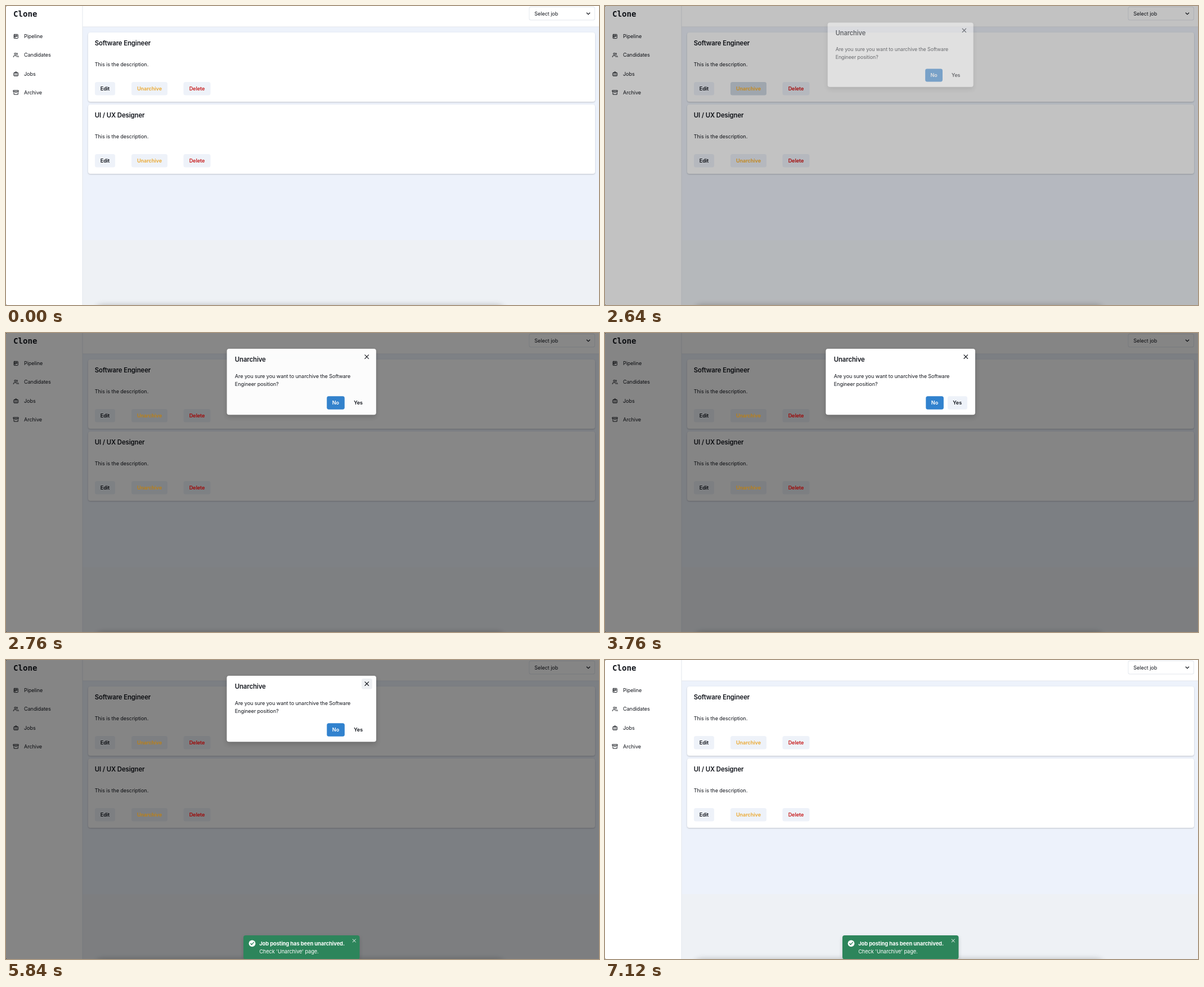
Write an HTML page with a canvas that moves like this. It is 1054x531 px and loops after 8000 ms.

```html
<!DOCTYPE html>
<html lang="en">
<head>
<meta charset="utf-8">
<title>Archived jobs</title>
<style>
  html, body { margin: 0; width: 100%; height: 100%; overflow: hidden; background: #fff; }
  canvas { display: block; width: 1054px; height: 531px; }
</style>
</head>
<body>
<canvas id="stage"></canvas>
<script>
const W = 1054, H = 531, LOOP = 8000, STEP = 40;
const SANS = 'Inter, "Open Sans", sans-serif';
const BODY = 9.15, HEAD = 11.4;
const INK = '#13161d', LINE = '#e4e8ee', SOFT = '#eef2f9';
const ORANGE = '#eba82f', RED = '#c81e1e', GREEN = '#2d855b';
const dpr = window.devicePixelRatio || 1;

function setUp(canvas) {
  canvas.width = W * dpr;
  canvas.height = H * dpr;
  const context = canvas.getContext('2d');
  context.scale(dpr, dpr);
  return context;
}

const screen = setUp(document.getElementById('stage'));
const layerCanvas = document.createElement('canvas');
const layer = setUp(layerCanvas);
let ctx = screen;

// --- timing helpers ---
const clamp = v => Math.min(1, Math.max(0, v));
const ramp = (t, from, to) => clamp((t - from) / (to - from));

function bezier(x1, y1, x2, y2) {
  const at = (a, b, u) => 3 * a * u * (1 - u) ** 2 + 3 * b * u * u * (1 - u) + u ** 3;
  return x => {
    if (x <= 0 || x >= 1) return clamp(x);
    let lo = 0, hi = 1;
    for (let i = 0; i < 30; i++) {
      const mid = (lo + hi) / 2;
      if (at(x1, x2, mid) < x) lo = mid; else hi = mid;
    }
    return at(y1, y2, lo);
  };
}
const easeOut = bezier(0, 0, 0.2, 1);
const easeIn = bezier(0.4, 0, 1, 1);
const easeInOut = bezier(0.4, 0, 0.2, 1);

// --- drawing helpers ---
function box(x, y, w, h, r, fill) {
  ctx.beginPath();
  ctx.roundRect(x, y, w, h, r);
  ctx.fillStyle = fill;
  ctx.fill();
}

function shadowed(color, blur, dy, draw) {
  ctx.save();
  ctx.shadowColor = color;
  ctx.shadowBlur = blur * dpr;
  ctx.shadowOffsetY = dy * dpr;
  draw();
  ctx.restore();
}

function text(label, x, midY, { size = BODY, weight = 400, color = INK, align = 'left' } = {}) {
  ctx.font = `${weight} ${size}px ${SANS}`;
  ctx.letterSpacing = `${-0.01 * size}px`;
  ctx.textAlign = align;
  ctx.fillStyle = color;
  ctx.fillText(label, x, midY + size * 0.36);
}

function polyline(points, color, width) {
  ctx.beginPath();
  points.forEach(([x, y]) => ctx.lineTo(x, y));
  ctx.strokeStyle = color;
  ctx.lineWidth = width;
  ctx.lineCap = ctx.lineJoin = 'round';
  ctx.stroke();
}

function cross(x, y, r, color, width) {
  polyline([[x - r, y - r], [x + r, y + r]], color, width);
  polyline([[x - r, y + r], [x + r, y - r]], color, width);
}

const withAlpha = (alpha, draw) => {
  ctx.save();
  ctx.globalAlpha *= alpha;
  draw();
  ctx.restore();
};

// --- page ---
const MENU = [
  ['Pipeline', 54, 'M5 3H19A2 2 0 0 1 21 5V19A2 2 0 0 1 19 21H5A2 2 0 0 1 3 19V5A2 2 0 0 1 5 3ZM7 7h3v9h-3zM14 7h3v5h-3z'],
  ['Candidates', 87, 'M17 21v-2a4 4 0 0 0-4-4H5a4 4 0 0 0-4 4v2M13 7a4 4 0 1 1-8 0a4 4 0 1 1 8 0M23 21v-2a4 4 0 0 0-3-3.87M16 3.13a4 4 0 0 1 0 7.75'],
  ['Jobs', 120.5, 'M4 7H20A2 2 0 0 1 22 9V19A2 2 0 0 1 20 21H4A2 2 0 0 1 2 19V9A2 2 0 0 1 4 7ZM16 21V5a2 2 0 0 0-2-2h-4a2 2 0 0 0-2 2v16'],
  ['Archive', 153.5, 'M21 8v13H3V8M1 3h22v5H1zM10 12h4']
].map(([label, y, d]) => ({ label, y, icon: new Path2D(d) }));

const BUTTONS = [
  ['Edit', 158, 36, INK],
  ['Unarchive', 223, 64, ORANGE],
  ['Delete', 315.5, 48, RED]
];
const CARDS = [['Software Engineer', 47], ['UI / UX Designer', 175]];

function drawSidebar() {
  ctx.font = 'bold 14.1px "DejaVu Sans Mono", monospace';
  ctx.letterSpacing = '0px';
  ctx.textAlign = 'left';
  ctx.fillStyle = INK;
  ctx.fillText('Clone', 13, 18.8);
  for (const { label, y, icon } of MENU) {
    ctx.save();
    ctx.translate(12.9, y - 4.8);
    ctx.scale(0.4, 0.4);
    ctx.lineWidth = 2.4;
    ctx.lineCap = ctx.lineJoin = 'round';
    ctx.strokeStyle = INK;
    ctx.stroke(icon);
    ctx.restore();
    text(label, 32, y);
  }
}

function drawButtonLabel([label, x, w, color], top) {
  text(label, x + w / 2, top + 99.6, { weight: 600, color, align: 'center' });
}

function drawCard(title, top, pressed) {
  shadowed('rgba(0,0,0,.2)', 2.5, 0.9, () => box(146, top, 901, 123, 4, '#fff'));
  text(title, 157.7, top + 19.2, { size: HEAD, weight: 600 });
  text('This is the description.', 157.7, top + 57);
  for (const button of BUTTONS) {
    const [label, x, w] = button;
    box(x, top + 88, w, 23.5, 3.5, SOFT);
    if (label === 'Unarchive' && pressed > 0) {
      withAlpha(pressed, () => box(x, top + 88, w, 23.5, 3.5, '#cbd5e0'));
    }
    drawButtonLabel(button, top);
  }
}

function drawPage(pressed) {
  box(0, 0, W, H, 0, '#fff');
  box(136, 37, W - 136, H - 37, 0, '#edf2fb');
  box(136, 416, W - 136, H - 416, 0, '#eef1f5');
  box(135.5, 0, 1, H, 0, LINE);
  box(136, 36.5, W - 136, 1, 0, LINE);
  drawSidebar();

  box(929.5, 1, 117.5, 24.5, 3.5, LINE);
  box(930.4, 1.9, 115.7, 22.7, 3, '#fff');
  text('Select job', 939.3, 13.4);
  polyline([[1032.3, 12.2], [1035, 14.9], [1037.7, 12.2]], INK, 1.3);

  CARDS.forEach(([title, top], i) => drawCard(title, top, i ? 0 : pressed));
  shadowed('rgba(0,0,0,.28)', 11, 0, () => box(160, H + 1, 725, 30, 10, '#999'));
  box(0, 0, 1, 1, 0, '#777');
  box(0, H - 1, 1, 1, 0, '#777');
}

// --- dialog and toast ---
function drawOverlay(alpha) {
  box(0, 0, W, H, 0, `rgba(0,0,0,${0.48 * alpha})`);
  // coloured labels keep more of their strength under the shade
  withAlpha(0.6 * alpha, () => {
    for (const [, top] of CARDS) BUTTONS.slice(1).forEach(b => drawButtonLabel(b, top));
  });
}

function drawDialogBody(yesHover, yesPressed, closeHover) {
  shadowed('rgba(0,0,0,.18)', 8, 4, () => box(392.4, 28, 265.6, 117.2, 4, '#fff'));
  text('Unarchive', 406.7, 46.6, { size: HEAD, weight: 600 });
  text('Are you sure you want to unarchive the Software', 406.7, 77);
  text('Engineer position?', 406.7, 91);
  withAlpha(closeHover, () => box(632, 33, 19, 18.7, 3.5, '#eef0f3'));
  cross(641.3, 42.2, 3.3, INK, 1.15);
  box(570.3, 112.2, 31.6, 23.5, 3.5, '#3182ce');
  text('No', 586, 124, { weight: 600, color: '#fff', align: 'center' });
  withAlpha(yesHover, () => box(609, 112.2, 35, 23.5, 3.5, SOFT));
  withAlpha(yesPressed, () => box(609, 112.2, 35, 23.5, 3.5, '#e2e8f0'));
  text('Yes', 626.2, 124, { weight: 600, align: 'center' });
}

function drawDialog(alpha, scale, ...states) {
  const cx = 525.2, cy = 86.6;
  layer.clearRect(0, 0, W, H);
  layer.save();
  layer.translate(cx, cy);
  layer.scale(scale, scale);
  layer.translate(-cx, -cy);
  ctx = layer;
  drawDialogBody(...states);
  layer.restore();
  ctx = screen;
  withAlpha(alpha, () => ctx.drawImage(layerCanvas, 0, 0, W, H));
}

function drawToast(progress) {
  ctx.save();
  ctx.globalAlpha = progress;
  ctx.translate(0, 14 * (1 - progress));
  shadowed('rgba(0,0,0,.15)', 7, 3, () => box(422, 489, 206.5, 42.4, 4, GREEN));
  ctx.beginPath();
  ctx.arc(437.5, 503.3, 5.9, 0, Math.PI * 2);
  ctx.fillStyle = '#fff';
  ctx.fill();
  polyline([[434.8, 503.6], [436.7, 505.4], [440.3, 501.4]], GREEN, 1.4);
  text('Job posting has been unarchived.', 450.2, 503.4, { size: 9.4, weight: 700, color: '#fff' });
  text("Check 'Unarchive' page.", 450.2, 517.8, { size: 9.25, color: '#fff' });
  cross(618.8, 498.5, 2.6, '#fff', 1);
  ctx.restore();
}

function render(t) {
  const pressed = (0.4 * ramp(t, 2330, 2520) + 0.4 * ramp(t, 2530, 2610)) * (1 - ramp(t, 2640, 2750));
  const opened = easeOut(ramp(t, 2600, 2800));
  const closed = easeIn(ramp(t, 6990, 7090));
  const shown = opened * (1 - closed);

  drawPage(pressed);
  if (shown > 0) {
    const scale = 0.95 + 0.05 * opened - 0.05 * closed ** 1.7;
    const yesHover = ramp(t, 3300, 3500) * (1 - ramp(t, 4560, 4760));
    const yesPressed = ramp(t, 4290, 4330) * (1 - ramp(t, 4400, 4560));
    drawOverlay(shown);
    drawDialog(shown, scale, yesHover, yesPressed, ramp(t, 5720, 5840));
  }
  const toast = easeInOut(ramp(t, 4340, 4740));
  if (toast > 0) drawToast(toast);
}

const start = performance.now();
function tick() {
  const t = (performance.now() - start) % LOOP;
  render(Math.floor(t / STEP) * STEP);
  requestAnimationFrame(tick);
}
tick();
</script>
</body>
</html>
```
